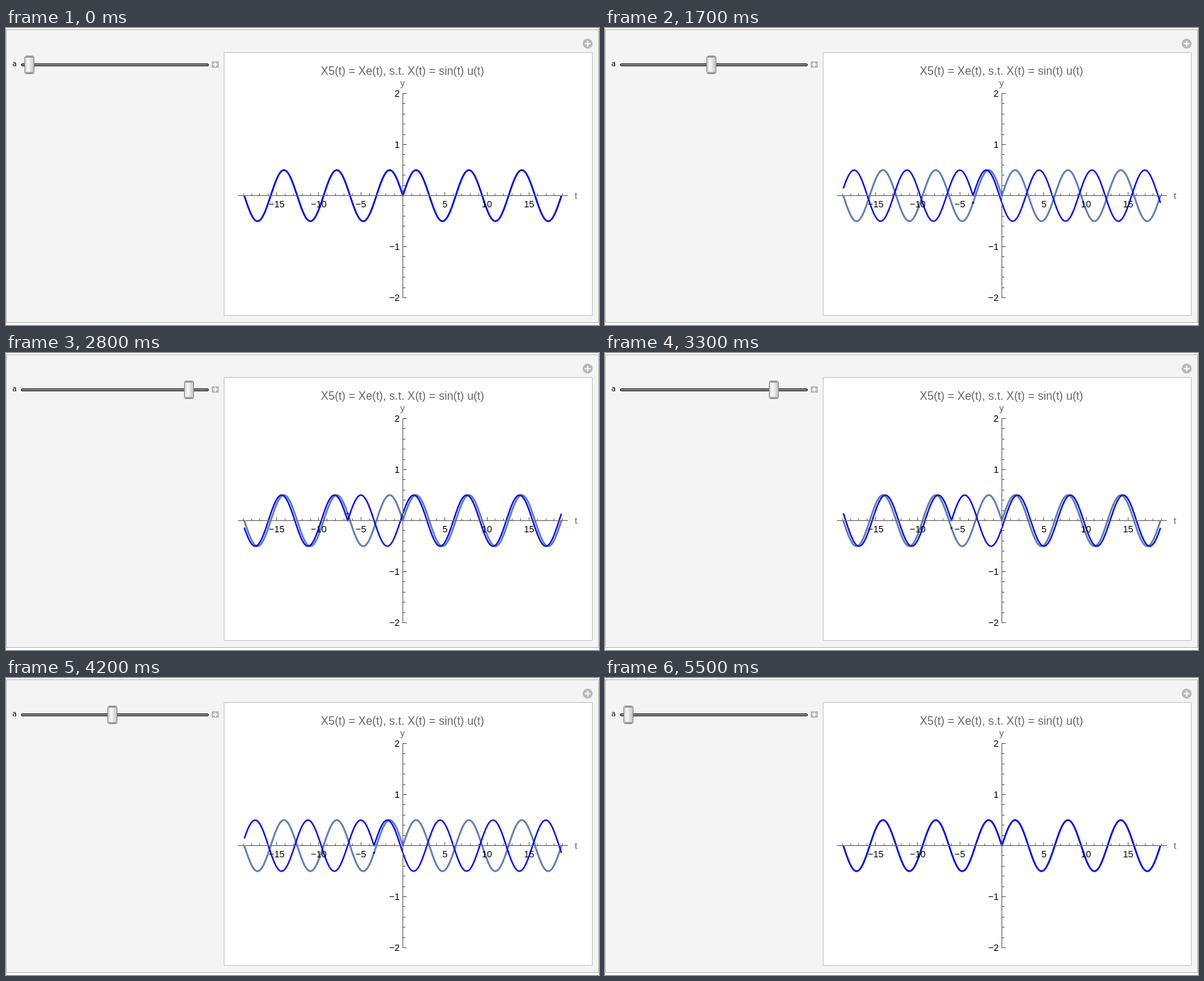
An HTML page with a canvas that plays this animation: 836 by 419 pixels, repeating every 6000 ms.

```html
<!DOCTYPE html>
<html lang="en">
<head>
<meta charset="utf-8">
<title>Shifted even part</title>
<style>
html, body { margin: 0; width: 100%; height: 100%; overflow: hidden; background: #fff; }
canvas { display: block; }
</style>
</head>
<body>
<canvas id="stage" width="836" height="419"></canvas>
<script>
const ctx = document.getElementById("stage").getContext("2d");
const LOOP = 6000, HOLD = 500, TICK = 100, STEPS = 25;
const ORIGIN = { x: 559.5, y: 236.5 };
const UNIT = { x: 11.86, y: 72 };
const T_MAX = 6 * Math.PI;
const SANS = "'Liberation Sans', Arial, sans-serif";

const toX = t => ORIGIN.x + t * UNIT.x;
const toY = v => ORIGIN.y - v * UNIT.y;
const evenPart = t => Math.sin(Math.abs(t)) / 2;

function line(x1, y1, x2, y2, color, width = 1) {
  ctx.strokeStyle = color;
  ctx.lineWidth = width;
  ctx.beginPath();
  ctx.moveTo(x1, y1);
  ctx.lineTo(x2, y2);
  ctx.stroke();
}

function text(str, x, y, size, color, align = "center", family = SANS) {
  ctx.font = `${size}px ${family}`;
  ctx.fillStyle = color;
  ctx.textAlign = align;
  ctx.fillText(str, x, y);
}

function box(x, y, w, h, fill, stroke) {
  ctx.fillStyle = fill;
  ctx.fillRect(x, y, w, h);
  ctx.strokeStyle = stroke;
  ctx.lineWidth = 1;
  ctx.strokeRect(x, y, w, h);
}

function roundBox(x, y, w, h, r, fill, stroke) {
  ctx.beginPath();
  ctx.roundRect(x, y, w, h, r);
  ctx.fillStyle = fill;
  ctx.fill();
  ctx.strokeStyle = stroke;
  ctx.lineWidth = 1;
  ctx.stroke();
}

function plus(x, y, reach) {
  line(x - reach, y, x + reach, y, "#fff", 2);
  line(x, y - reach, x, y + reach, "#fff", 2);
}

function drawPanel() {
  ctx.fillStyle = "#fff";
  ctx.fillRect(0, 0, 836, 419);
  box(0.5, 2.5, 835, 413, "#f4f4f4", "#bababa");
  box(307.5, 34.5, 519, 371, "#fff", "#c4c4c4");
  ctx.fillStyle = "#b8b8b8";
  ctx.beginPath();
  ctx.arc(820, 22, 7, 0, 2 * Math.PI);
  ctx.fill();
  plus(820, 22, 4);
}

function drawSlider(shift) {
  text("a", 9, 54, 10, "#000", "left", "'DejaVu Sans', sans-serif");
  roundBox(21.5, 50.5, 264, 3, 1.5, "#8c8c8c", "#1c1c1c");
  ctx.fillStyle = "#b8b8b8";
  ctx.fillRect(290, 47, 10, 9);
  plus(295, 51.5, 3);

  const x = Math.round(33 + 34.25 * shift);
  const shade = ctx.createLinearGradient(x - 6, 0, x + 6, 0);
  shade.addColorStop(0, "#d2d2d2");
  shade.addColorStop(0.35, "#fafafa");
  shade.addColorStop(1, "#c2c2c2");
  roundBox(x - 6.5, 39.5, 13, 25, 2.5, shade, "#888");
  line(x - 5, 41, x + 5, 41, "#a0a0a0", 2);
  line(x - 5, 63, x + 5, 63, "#a0a0a0", 2);
}

function curve(shift, color, width) {
  ctx.strokeStyle = color;
  ctx.lineWidth = width;
  ctx.lineJoin = "round";
  ctx.beginPath();
  const plot = t => ctx.lineTo(toX(t), toY(evenPart(t + shift)));
  for (let t = -T_MAX; t < -shift; t += 0.05) plot(t);
  for (let t = -shift; t < T_MAX; t += 0.05) plot(t);
  plot(T_MAX);
  ctx.stroke();
}

// Small blue mark left where the step of the shifted signal sits.
function jumpMark(shift) {
  if (shift <= Math.PI) return;
  ctx.fillStyle = "#00f";
  ctx.beginPath();
  ctx.arc(toX(-shift), toY(evenPart(shift)), 1.5, 0, 2 * Math.PI);
  ctx.fill();
}

const label = n => String(n).replace("-", "\u2212");

function drawAxes() {
  const gray = "#666";
  line(327, ORIGIN.y, 792, ORIGIN.y, gray);
  line(ORIGIN.x, 92, ORIGIN.x, 381, gray);
  for (let n = -19; n <= 19; n++) {
    if (n === 0) continue;
    const x = Math.floor(toX(n)) + 0.5;
    const major = n % 5 === 0;
    line(x, ORIGIN.y, x, ORIGIN.y - (major ? 5 : 3), gray);
    if (major) text(label(n), toX(n), 253, 13, "#000");
  }
  for (let n = -10; n <= 10; n++) {
    if (n === 0) continue;
    const y = Math.floor(toY(n / 5)) + 0.5;
    const major = n % 5 === 0;
    line(ORIGIN.x, y, ORIGIN.x + (major ? 5.5 : 3.5), y, gray);
    if (major) text(label(n / 5), 555, y + 4.5, 13, "#000", "right");
  }
  text("y", 559, 82, 13, gray);
  text("t", 803.5, 241, 13, gray);
  text("X5(t) = Xe(t), s.t. X(t) = sin(t) u(t)", 559, 66, 16, gray);
}

function shiftAt(time) {
  if (time < HOLD || time >= LOOP - HOLD) return 0;
  const n = Math.floor((time - HOLD) / TICK);
  const step = n < STEPS ? n : 2 * STEPS - 1 - n;
  return 0.005 + step * 0.2851;
}

function frame(now) {
  const shift = shiftAt(now % LOOP);
  drawPanel();
  drawSlider(shift);
  curve(0, "#5e81b5", 2.6);
  curve(shift, "#00f", 2.1);
  jumpMark(shift);
  drawAxes();
  requestAnimationFrame(frame);
}
requestAnimationFrame(frame);
</script>
</body>
</html>
```
